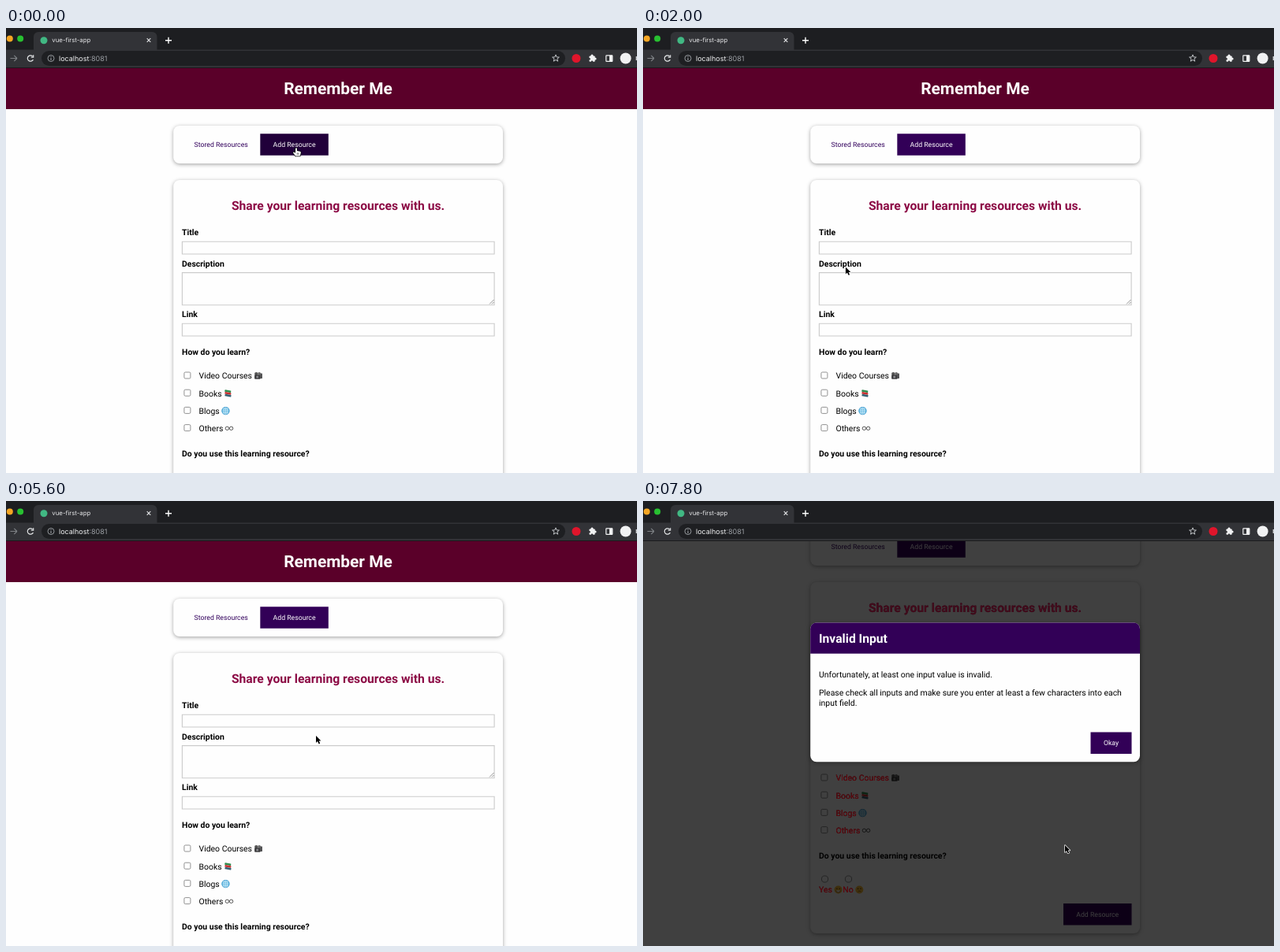
Recreate the animation shown at these times as an HTML page with a canvas. Size 800 by 565 pixels, loop 8000 ms.

```html
<!DOCTYPE html>
<html lang="en">
<head>
<meta charset="utf-8">
<title>Remember Me</title>
<style>
html, body { margin: 0; width: 100%; height: 100%; overflow: hidden; background: #fff; }
canvas { display: block; width: 800px; height: 565px; }
</style>
</head>
<body>
<canvas id="stage" width="800" height="565"></canvas>
<script>
const ctx = document.getElementById('stage').getContext('2d');
const LOOP = 8000, STEP = 200;
const OPEN_LIST = 2800, OPEN_FORM = 5000, OPEN_DIALOG = 7200;
const PURPLE = '#320057', DARK = '#21003a', LILAC = '#ebcbfd', WINE = '#5a0029';
const PAGE = '#fefefe', LIGHT = '#e4e6e8';
const LEFT = 223, RIGHT = 619.5, CARD_X = 212.2, CARD_W = 417.8;
const SIZE = 10.45, SMALL = 8.71, ITEM = 9.7, LARGE = 15.68;

const START = { x: 368, y: 152 };
const MOVES = [
  { from: 200, to: 1200, x: 255, y: 330 },
  { from: 1800, to: 2600, x: 267, y: 160 },
  { from: 3000, to: 3600, x: 300, y: 420 },
  { from: 3600, to: 4200, x: 367, y: 152 },
  { from: 5000, to: 5600, x: 393, y: 298 },
  { from: 5600, to: 7000, x: 563.5, y: 521.5 },
  { from: 7200, to: 7800, x: 535, y: 437 }
];

function ease(t, from, to) {
  const p = Math.min(1, Math.max(0, (t - from) / (to - from)));
  return p * p * (3 - 2 * p);
}

function pointerAt(t) {
  return MOVES.reduce((p, m) => {
    const f = ease(t, m.from, m.to);
    return { x: p.x + (m.x - p.x) * f, y: p.y + (m.y - p.y) * f };
  }, START);
}

// Down and back up, then down to the submit button
const scrollAt = t => 90 * (ease(t, 500, 1100) - ease(t, 1150, 1780) + ease(t, 5800, 6600));

function text(s, x, y, size = SIZE, color = '#000', weight = 400, align = 'left', family = 'Roboto') {
  ctx.font = `${weight} ${size}px ${family}, sans-serif`;
  ctx.textAlign = align;
  ctx.fillStyle = color;
  ctx.fillText(s, x, y);
}

function box(x, y, w, h, color, radius = 0) {
  ctx.fillStyle = color;
  ctx.beginPath();
  ctx.roundRect(x, y, w, h, radius);
  ctx.fill();
}

function frame(x, y, w, h, color, radius = 0, width = 1) {
  ctx.strokeStyle = color;
  ctx.lineWidth = width;
  ctx.beginPath();
  ctx.roundRect(x, y, w, h, radius);
  ctx.stroke();
}

function disc(x, y, r, color) {
  ctx.fillStyle = color;
  ctx.beginPath();
  ctx.arc(x, y, r, 0, 7);
  ctx.fill();
}

function ring(x, y, r, color, width = 0.8, from = 0, to = Math.PI * 2) {
  ctx.strokeStyle = color;
  ctx.lineWidth = width;
  ctx.beginPath();
  ctx.arc(x, y, r, from, to);
  ctx.stroke();
}

function lines(color, width, ...segments) {
  ctx.strokeStyle = color;
  ctx.lineWidth = width;
  ctx.beginPath();
  for (const [x1, y1, x2, y2] of segments) {
    ctx.moveTo(x1, y1);
    ctx.lineTo(x2, y2);
  }
  ctx.stroke();
}

function card(y, h) {
  ctx.save();
  ctx.shadowColor = 'rgba(0,0,0,.36)';
  ctx.shadowBlur = 5.2;
  ctx.shadowOffsetY = 1.3;
  box(CARD_X, y, CARD_W, h, PAGE, 7.8);
  ctx.restore();
}

function button(label, x, y, w, color = PURPLE, ink = '#fff') {
  box(x, y, w, 27.4, color);
  text(label, x + w / 2, y + 16.7, SMALL, ink, 400, 'center');
}

function face(happy) {
  disc(0, 0, 5, '#f8bb32');
  for (const side of [-1, 1]) disc(side * 1.7, -1.2, 0.75, '#5d3510');
  if (happy) {
    ctx.fillStyle = '#fff4dc';
    ctx.beginPath();
    ctx.arc(0, 0.7, 2.8, 0, Math.PI);
    ctx.fill();
    ring(0, 0.7, 2.8, '#7a3f10', 0.6, 0, Math.PI);
  } else {
    ring(0, 3.6, 2, '#7a3f10', 0.8, Math.PI * 1.15, Math.PI * 1.85);
  }
}

const ICONS = {
  camera() {
    disc(-2.4, -2.6, 2.2, '#555');
    disc(1.4, -2.9, 1.9, '#6a6a6a');
    box(-4.6, -1.4, 7.6, 5.4, '#3c3c3e', 1);
    box(2.6, -3.2, 2.6, 6.4, '#4a4a4c', 0.5);
    disc(-1, 1.2, 1.5, '#8b8b90');
  },
  books() {
    ctx.rotate(0.18);
    ['#2f8a4c', '#c72f2f', '#345f73'].forEach((color, i) =>
      box(-4.5 + i * 0.6, -4 + i * 2.7, 8, 2.6, color, 0.5));
  },
  globe() {
    disc(0, 0, 5, '#58b4e0');
    frame(-2.3, -4.7, 4.6, 9.4, '#d9f0fa', 2.3, 0.7);
    for (const y of [-2.4, 0, 2.4]) lines('#d9f0fa', 0.7, [-4.2, y, 4.2, y]);
    lines('#d9f0fa', 0.7, [0, -4.7, 0, 4.7]);
    ring(0, 0, 4.7, '#3a93c8', 0.6);
  },
  loop() {
    for (const side of [-1, 1]) ring(side * 2.6, 0, 2.2, '#444', 0.9);
  },
  happy: () => face(true),
  sad: () => face(false)
};

// Text followed by a small picture
function iconText(s, x, y, icon, size = SIZE) {
  text(s, x, y, size);
  const w = ctx.measureText(s + ' ').width;
  ctx.save();
  ctx.translate(x + w + 5.1, y - 3.7);
  ICONS[icon]();
  ctx.restore();
}

const VIDEO = 'camera', BOOKS = ['Books', 'books'], BLOGS = ['Blogs', 'globe'];
const OPTIONS = [['Video Courses', VIDEO], BOOKS, BLOGS, ['Others', 'loop']]
  .map(([label, icon], i) => ({ label, icon, x: 244.5, y: 445.4 + i * 22.2 }));
const CHOICES = [
  ...OPTIONS,
  { label: 'Yes', icon: 'happy', x: LEFT, y: 587.2 },
  { label: 'No', icon: 'sad', x: 253.2, y: 587.2 }
];

function browserTab() {
  box(0, 0, 800, 28, '#1d1e21');
  box(0, 27.5, 800, 23.5, '#323337');
  box(35, 5, 156.5, 24, '#323337', [6, 6, 0, 0]);
  box(0, 50, 800, 1, '#1b1b1d');
  disc(4.8, 13.5, 4, '#f5a623');
  disc(18.2, 13.5, 4, '#28c131');
  disc(48, 15.7, 4.5, '#41b883');
  text('vue-first-app', 58.3, 18.4, 7.84, '#e6e7e9', 400, 'left', 'Inter');
  lines(LIGHT, 1.1, [178.7, 13.2, 183.3, 17.8], [183.3, 13.2, 178.7, 17.8]);
  lines('#fff', 1.4, [202, 15.7, 210, 15.7], [206, 11.7, 206, 19.7]);
}

function star(x, y) {
  ctx.beginPath();
  for (let i = 0; i < 10; i++) {
    const r = i % 2 ? 2 : 4.6, a = i * Math.PI / 5 - Math.PI / 2;
    ctx.lineTo(x + r * Math.cos(a), y + r * Math.sin(a));
  }
  ctx.closePath();
  ctx.strokeStyle = '#d0d3d6';
  ctx.lineWidth = 0.9;
  ctx.stroke();
}

function toolbar() {
  const mid = 38.5, gray = '#a3a7ac';
  lines('#7e8185', 1.1, [5.5, mid, 14, mid], [10.3, mid - 3.7, 14, mid], [10.3, mid + 3.7, 14, mid]);
  ring(31, mid, 3.7, LIGHT, 1.2, 0.4, 5.5);
  lines(LIGHT, 1.2, [34.7, 34.3, 34.7, 37.4], [31.8, 37.2, 35.2, 37.2]);
  box(45, 29, 664, 19, '#1e1f22', 9.5);
  ring(57, mid, 4, gray, 0.9);
  lines(gray, 1, [57, 38, 57, 41], [57, 36, 57, 37]);
  text('localhost', 67, 41.7, 9, '#f1f2f3', 400, 'left', 'Inter');
  text(':8081', 67 + ctx.measureText('localhost').width, 41.7, 9, '#9a9ea3', 400, 'left', 'Inter');
  star(697, mid);
  disc(723, mid, 5.5, '#e0152b');
  box(739.5, 35.5, 7.2, 7.2, '#f1f2f3', 0.8);
  disc(743, 35.2, 1.6, '#f1f2f3');
  disc(747, 39, 1.6, '#f1f2f3');
  disc(739.6, 39.2, 1.2, '#323337');
  disc(743, 42.8, 1.2, '#323337');
  frame(760.8, 34.8, 8, 7.6, '#f1f2f3', 0.6, 1.2);
  box(765, 34.8, 3.8, 7.6, '#f1f2f3');
  disc(785.6, mid, 7, '#f1f2f3');
  box(798.6, 36, 1.4, 5, '#d0d3d6');
}

function nav(view, over) {
  const onForm = view === 'form';
  const split = onForm ? 322.3 : 323.6;
  const fill = (active, hover) => active ? (hover ? DARK : PURPLE) : (hover ? LILAC : PAGE);
  const ink = active => active ? '#fff' : '#32005c';
  card(124, 48);
  button('Stored Resources', LEFT, 134.3, split - LEFT, fill(!onForm, over === 'stored'), ink(!onForm));
  button('Add Resource', split, 134.3, 408.8 - split, fill(onForm, over === 'add'), ink(onForm));
}

function heading(color) {
  text('Share your learning resources with us.', 421, 231, LARGE, color, 700, 'center');
}

function form(over) {
  const label = (s, y) => text(s, LEFT, y, SIZE, '#000', 700);
  const field = (s, y, h) => {
    label(s, y);
    frame(LEFT + 0.4, y + 8.1, RIGHT - LEFT - 0.8, h, '#cbcbcb', 0, 1.1);
  };
  card(193, 446);
  heading('#8c0a45');
  field('Title', 263.1, 15.8);
  field('Description', 302.5, 41.2);
  lines('#666', 0.7, [613, 350.5, 618.5, 345], [616, 350.5, 618.5, 348]);
  field('Link', 367.1, 15.8);
  label('How do you learn?', 415.2);
  label('Do you use this learning resource?', 544.1);
  for (const o of OPTIONS) frame(225.9, o.y - 8.4, 8, 8, '#767676', 1.5, 0.8);
  for (const x of [230.5, 260.5]) ring(x, 570, 4.1, '#767676');
  for (const c of CHOICES) iconText(c.label, c.x, c.y, c.icon);
  button('Add Resource', 533, 601, 86.5, over === 'submit' ? DARK : PURPLE);
}

function resource(top, title, about, used, modes) {
  const row = i => top + 52.8 + i * 18.25;
  const item = i => top + 107 + i * 12.65;
  const end = item(modes.length) - 9.5 + SIZE * 0.95;
  card(top, end + 13.3 - top);
  text(title, LEFT, top + 28.5, 13.07, '#000', 700);
  button('Delete', 562.3, top + 10.4, 57.2);
  text(about, LEFT, row(0));
  iconText('Is this resource used by the Author - ' + (used ? 'Yes' : 'No'), LEFT, row(1), used ? 'happy' : 'sad');
  text('Authors mode of learning -', LEFT, row(2));
  modes.forEach(([s, icon], i) => {
    ring(242.5, item(i) - 3, 1.7, '#222', 0.7);
    iconText(s, 249, item(i), icon, ITEM);
  });
  text('View Resource', LEFT, end + 2.5, SIZE, '#b84300');
}

function list() {
  resource(193, 'Official Guide', 'The official Vue.js documentation.', true,
    [['Videos Tutorials', VIDEO], BLOGS, BOOKS]);
  resource(375, 'Norbiq', 'Learn to norbiq...', false, [BOOKS, BLOGS]);
}

// Darkens the page and marks the rejected choices
function backdrop() {
  box(0, 0, 800, 800, 'rgba(0,0,0,.75)');
  heading('#420c1c');
  for (const c of CHOICES) text(c.label, c.x, c.y, SIZE, '#6c0810');
}

function dialog() {
  card(154.4, 176.8);
  box(CARD_X, 154.4, CARD_W, 39.4, PURPLE, [7.8, 7.8, 0, 0]);
  text('Invalid Input', LEFT, 179.5, LARGE, '#fff', 700);
  text('Unfortunately, at least one input value is invalid.', LEFT, 224.4);
  text('Please check all inputs and make sure you enter at least a few characters into each', LEFT, 247.3);
  text('input field.', LEFT, 259.7);
  button('Okay', 567.5, 293.5, 52);
}

const ARROW = new Path2D('M0 0V9L2 7.1L3.6 10.4L5.2 9.7L3.7 6.5H6.4Z');
const HAND = new Path2D('M-1 1Q0-.5 1 1V4L5 4.8Q6 5 5.8 6.5L4.8 10.5H-1L-4 6.6Q-3.6 5-2.4 5.8L-1 6.8Z');

function pointer(x, y, hand) {
  const shape = hand ? HAND : ARROW;
  ctx.save();
  ctx.translate(x, y);
  ctx.lineJoin = 'round';
  ctx.lineWidth = 1.4;
  ctx.strokeStyle = hand ? '#000' : '#fff';
  ctx.fillStyle = hand ? '#fff' : '#000';
  ctx.stroke(shape);
  ctx.fill(shape);
  if (hand) lines('#000', 0.6, [1.2, 6.5, 1.2, 8.8], [2.8, 6.5, 2.8, 8.8]);
  ctx.restore();
}

function hovered(view, x, y) {
  if (y > 134 && y < 162) {
    if (x > LEFT && x < 323) return 'stored';
    if (x > 323 && x < 409) return 'add';
  }
  if (view === 'form' && x > 533 && x < RIGHT && y > 601 && y < 628) return 'submit';
  return '';
}

function draw(t) {
  const { x, y } = pointerAt(t);
  const scroll = scrollAt(t);
  const view = t >= OPEN_LIST && t < OPEN_FORM ? 'list' : 'form';
  const modal = t >= OPEN_DIALOG;
  const over = modal ? '' : hovered(view, x, y + scroll);

  ctx.textRendering = 'geometricPrecision';
  box(0, 0, 800, 565, PAGE);
  ctx.save();
  ctx.translate(0, -scroll);
  box(0, 51, 800, 52, WINE);
  text('Remember Me', 421, 84.2, 20.9, '#fff', 700, 'center');
  nav(view, over);
  if (view === 'form') form(over); else list();
  if (modal) backdrop();
  ctx.restore();
  if (modal) dialog();
  browserTab();
  toolbar();
  pointer(x, y, over !== '');
}

function tick(now) {
  draw(Math.floor(now % LOOP / STEP) * STEP);
  requestAnimationFrame(tick);
}
draw(0);
requestAnimationFrame(tick);
</script>
</body>
</html>
```
